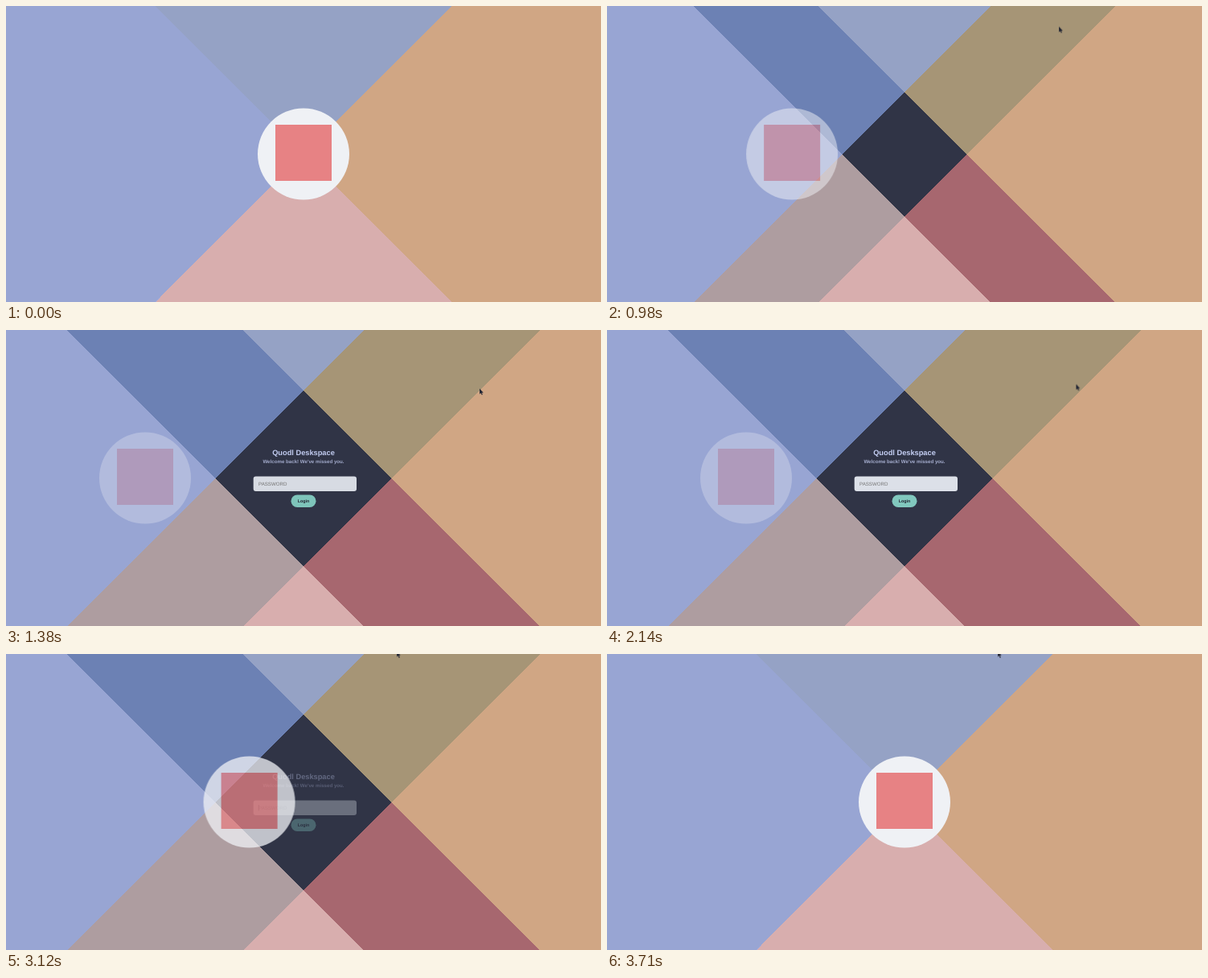
Write an HTML page that moves like this. It is 740 by 369 pixels and loops after 4910 ms.

```html
<!DOCTYPE html>
<html lang="en">
<head>
<meta charset="utf-8">
<title>Login panels</title>
<style>
  html, body { margin: 0; width: 100%; height: 100%; overflow: hidden; background: #303446; }
  #stage { position: relative; width: 740px; height: 369px; overflow: hidden; background: #303446; }
  .panel {
    position: absolute; left: 370px; top: -415.5px; width: 1200px; height: 1200px;
    transform-origin: 0 50%; opacity: .65;
  }
  svg { position: absolute; left: 0; top: 0; }
  text { font-family: "Liberation Sans", Arial, sans-serif; font-size: 6.16px; text-rendering: geometricPrecision; }
  .mid { text-anchor: middle; font-weight: bold; }
</style>
</head>
<body>
<div id="stage">
  <svg width="740" height="369" viewBox="0 0 740 369">
    <g id="form">
      <text class="mid" x="370" y="156.2" fill="#c6d0f5" style="font-size:9.25px">Quodl Deskspace</text>
      <text class="mid" x="370" y="165.9" fill="#a5adce">Welcome back! We've missed you.</text>
      <rect x="307.7" y="182.6" width="128.3" height="18.4" rx="3" fill="#dce0e8"/>
      <text x="314" y="193.8" fill="#757575">PASSWORD</text>
      <rect id="caret" x="313.8" y="188" width=".8" height="7.4" fill="#303446"/>
      <rect x="354.5" y="205.5" width="31" height="15.4" rx="7.7" fill="#81c8be"/>
      <text class="mid" x="370" y="215" fill="#232634" style="font-size:5.4px">Login</text>
    </g>
  </svg>
  <svg id="top" width="740" height="369" viewBox="0 0 740 369">
    <g id="badge">
      <circle cx="370" cy="184.5" r="57" fill="#eff1f5"/>
      <rect x="335" y="148" width="70" height="70" fill="#e78284"/>
    </g>
    <path id="cursor" d="M0 0V7L1.6 5.6 2.7 8 3.8 7.5 2.7 5.2H4.8Z" fill="#232634"/>
  </svg>
</div>
<script>
const LOOP = 4910;
const EASE = 'cubic-bezier(.445,.05,0,1)';
// Transition windows: [start, end]
const OPEN = [815, 1265], SHOW = [997, 1497], HIDE = [2950, 3450], CLOSE = [3150, 3650];
const stage = document.getElementById('stage');
const get = id => document.getElementById(id);

// steps: [time, style, easing to the next step]
function play(el, steps) {
  const frames = steps.map(([t, style, easing = 'linear']) => ({ ...style, easing, offset: t / LOOP }));
  el.animate(frames, { duration: LOOP, iterations: Infinity });
}

// Eases from rest to active during one window and back during the other.
function hover(el, rest, active, [in0, in1], [out0, out1]) {
  play(el, [
    [0, rest], [in0, rest, EASE], [in1, active],
    [out0, active, EASE], [out1, rest], [LOOP, rest]
  ]);
}

const panels = [[45, '#e78284'], [135, '#f2d5cf'], [-45, '#e5c890'], [-135, '#8caaee']];
for (const [angle, color] of panels) {
  const el = document.createElement('div');
  el.className = 'panel';
  el.style.background = color;
  stage.insertBefore(el, get('top'));
  const at = d => ({ transform: `rotate(${angle}deg) translateX(${d}px)` });
  hover(el, at(0), at(77.1), OPEN, CLOSE);
}

hover(get('form'), { opacity: 0 }, { opacity: 1 }, SHOW, HIDE);
hover(get('badge'),
  { transform: 'translateX(0px)', opacity: 1 },
  { transform: 'translateX(-197px)', opacity: .3 }, OPEN, HIDE);

const blink = [[0, 0], [1660, 1], [2120, 0], [2640, 1], [3140, 0], [LOOP, 0]];
play(get('caret'), blink.map(([t, opacity]) => [t, { opacity }, 'step-end']));

const path = [
  [0, 544, -10], [820, 544, -10], [980, 562, 25.5], [1300, 589, 73], [2100, 589, 73],
  [2640, 516, 1], [2860, 486.5, -1.5], [2990, 486, -3.5], [LOOP, 486, -3.5]
];
play(get('cursor'), path.map(([t, x, y]) => [t, { transform: `translate(${x}px,${y}px)` }]));
</script>
</body>
</html>
```
